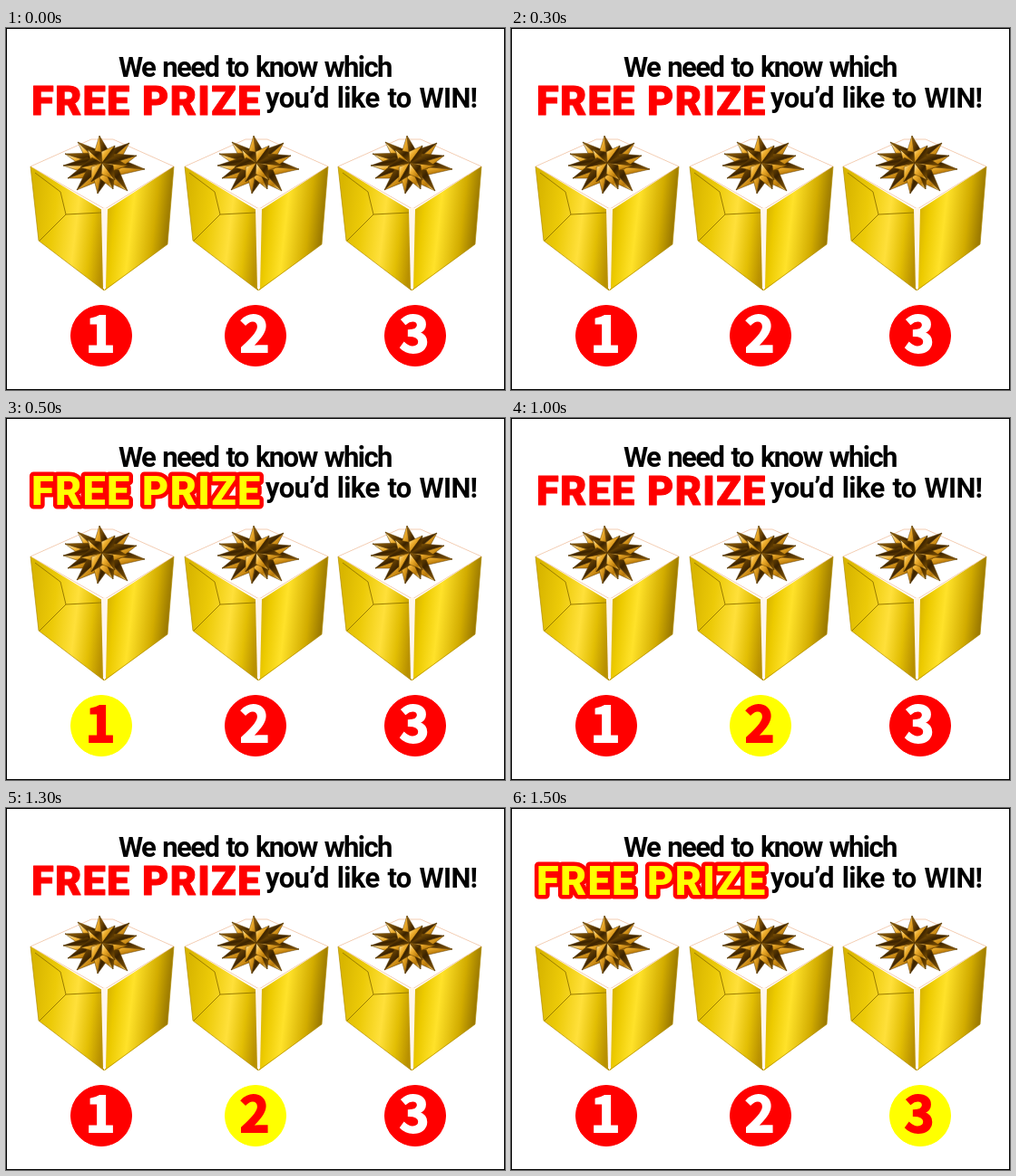
An HTML page for the animation above (2 s loop, 550x400 px).

```html
<!DOCTYPE html>
<html lang="en">
<head>
<meta charset="utf-8">
<title>Pick a prize</title>
<style>
html, body { margin: 0; width: 100%; height: 100%; overflow: hidden; background: #fff; }
svg { display: block; width: 550px; height: 400px; }
.line { font: 700 31px Roboto, "Liberation Sans", sans-serif; }
#prize { font: 900 45px Roboto, "Liberation Sans", sans-serif; letter-spacing: 1.3px;
  fill: #f00; stroke: #f00; stroke-width: 1px; stroke-linejoin: round; paint-order: stroke; }
.num { font: 900 56px "Noto Sans CJK JP", "Noto Sans CJK SC", sans-serif; text-anchor: middle; stroke-width: 1.8px; }
</style>
</head>
<body>
<svg viewBox="0 0 550 400">
  <defs>
    <linearGradient id="left" x1="0" y1=".45" x2="1" y2=".65">
      <stop offset="0" stop-color="#d9b600"/><stop offset=".3" stop-color="#ecca08"/>
      <stop offset=".6" stop-color="#ffe03a"/><stop offset=".82" stop-color="#e2be04"/>
      <stop offset="1" stop-color="#b89000"/>
    </linearGradient>
    <linearGradient id="right" x1="0" y1=".4" x2="1" y2=".6">
      <stop offset="0" stop-color="#d4b000"/><stop offset=".15" stop-color="#ecca00"/>
      <stop offset=".38" stop-color="#ffe22a"/><stop offset=".7" stop-color="#d2ac00"/>
      <stop offset="1" stop-color="#806000"/>
    </linearGradient>
    <linearGradient id="lit" x1="0" y1="0" x2="1" y2="1">
      <stop offset="0" stop-color="#fff6d0"/><stop offset=".35" stop-color="#f0b030"/>
      <stop offset=".7" stop-color="#b87808"/><stop offset="1" stop-color="#ffdf80"/>
    </linearGradient>
    <linearGradient id="dark" x1="0" y1="0" x2="1" y2="1">
      <stop offset="0" stop-color="#a06a08"/><stop offset=".5" stop-color="#3a2200"/>
      <stop offset="1" stop-color="#8a5a04"/>
    </linearGradient>
    <g id="gift">
      <path d="M27 153L94 123L118 123L185 153L109 200Z" fill="#fff" stroke="#f0c0a0" stroke-width=".8"/>
      <path d="M27 153L106 201L108 290L36 235Z" fill="url(#left)"/>
      <path d="M111 201L185 153L178 239L109 290Z" fill="url(#right)"/>
      <path d="M105 200L109 198L112 200L110 288L107 288Z" fill="#fff6ec"/>
      <g fill="none" stroke="#9a7c00">
        <path d="M32 160L60 181L66 206L37 235M66 206L105 204"/>
        <path d="M27 153L36 235L108 290L178 239L185 153" stroke="#b08c00" stroke-width=".7"/>
      </g>
      <g id="bow"/>
    </g>
  </defs>
  <rect x=".5" y=".5" width="549" height="399" fill="#fff" stroke="#000"/>
  <text class="line" x="124" y="54" letter-spacing="-1.6" word-spacing="2">We need to know which</text>
  <text id="prize" x="28" y="95.500">FREE PRIZE</text>
  <text class="line" x="286" y="88" letter-spacing="-.7" word-spacing="2">you’d like to WIN!</text>
  <g id="stage"></g>
</svg>
<script>
const NS = 'http://www.w3.org/2000/svg';
const RED = '#f00', YELLOW = '#ff0', WHITE = '#fff';
const stage = document.getElementById('stage');
const bow = document.getElementById('bow');

function add(parent, tag, attrs, text) {
  const el = document.createElementNS(NS, tag);
  for (const k in attrs) el.setAttribute(k, attrs[k]);
  if (text) el.textContent = text;
  return parent.appendChild(el);
}

// A folded ribbon point: one lit half, one shaded half.
function spike(cx, cy, x, y, w) {
  const dx = x - cx, dy = y - cy, d = Math.hypot(dx, dy);
  const nx = -dy / d * w, ny = dx / d * w;
  const bx = cx + dx * .4, by = cy + dy * .4;
  const half = (s, fill) => add(bow, 'path', {
    d: `M${cx} ${cy}L${bx + nx * s} ${by + ny * s}L${x} ${y}Z`,
    fill: `url(#${fill})`, stroke: '#5a3800', 'stroke-width': .5
  });
  const lit = nx - ny > 0 ? -1 : 1;
  half(lit, 'lit');
  half(-lit, 'dark');
}

const outer = [[79, 126], [103, 119], [136, 127], [65, 139], [153, 156], [144, 141],
  [63, 152], [68, 166], [78, 179], [134, 180], [101, 183], [118, 178]];
const inner = [[90, 134], [120, 130], [82, 154], [134, 152], [94, 170], [120, 168]];
outer.forEach(([x, y]) => spike(107, 152, x, y, 9));
inner.forEach(([x, y]) => spike(106, 149, x, y, 8));

// Hard-stepped loop through a table of four poses.
function loop(el, poses) {
  const frames = [...poses, poses[0]].map((p, i) => ({ ...p, offset: i / 4, easing: 'step-end' }));
  el.animate(frames, { duration: 2000, iterations: Infinity });
}

const blink = (on, off, lit) => [0, 1, 2, 3].map(i => {
  const c = i === lit ? on : off;
  return { fill: c, stroke: c };
});

[[0, 105], [170, 275], [339, 451]].forEach(([dx, cx], i) => {
  add(stage, 'use', { href: '#gift', x: dx });
  const disc = add(stage, 'circle', { cx, cy: 340, r: 33.5, fill: RED });
  const num = add(stage, 'text', { class: 'num', x: cx - 1, y: 358, fill: WHITE }, String(i + 1));
  loop(disc, blink(YELLOW, RED, i + 1));
  loop(num, blink(RED, WHITE, i + 1));
});

const plain = { fill: RED, strokeWidth: '1px' };
const glow = { fill: YELLOW, strokeWidth: '9px' };
loop(document.getElementById('prize'), [plain, glow, plain, glow]);
</script>
</body>
</html>
```
